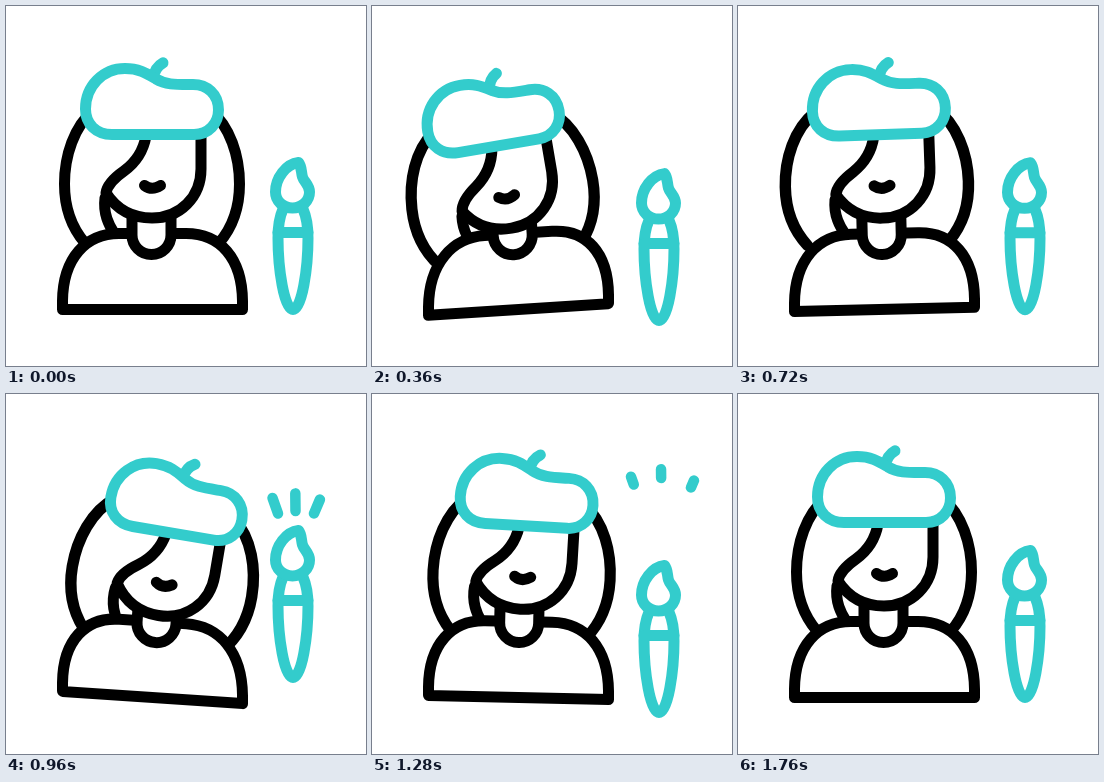
Animation of 360x360 px, one loop 2000 ms. Source, as an HTML page:

```html
<!DOCTYPE html>
<html lang="en">
<head>
<meta charset="utf-8">
<title>Artist and brush</title>
<style>
  @property --lean { syntax: "<angle>"; inherits: true; initial-value: 0deg; }

  html, body { margin: 0; width: 100%; height: 100%; overflow: hidden; background: #fff; }
  svg { display: block; width: 100vw; height: 100vh; }
  g, path {
    fill: #fff; stroke: #000; stroke-width: 11;
    stroke-linecap: round; stroke-linejoin: round;
  }
  .open path, path.open { fill: none; }
  .teal, .teal path { stroke: #33cccc; }

  .body, .torso, .neck, .head, .hair, .left, .brush {
    transform-box: view-box;
    animation: 2s ease-in-out infinite;
  }
  .body { animation-name: lean; }
  .torso, .neck { transform-origin: 146px 303.5px; }
  .torso { transform: skewY(var(--lean)); }
  .neck { rotate: var(--lean); }
  .head { transform-origin: 146px 250px; animation-name: tilt, sink; }
  .hair { transform-origin: 146px 250px; animation-name: sway; }
  .left { transform-origin: 86px 110px; animation-name: swing; }
  .brush { animation-name: bob; }
  .rays path { stroke-width: 10.5; animation: burst 2s linear infinite, blink 2s step-end infinite; }

  @keyframes lean {
    0%, 76%, 100% { --lean: 0deg; }
    28% { --lean: -5deg; }
    46% { --lean: 3.9deg; }
  }
  @keyframes tilt {
    0%, 76%, 100% { rotate: 0deg; }
    26% { rotate: -12deg; }
    47% { rotate: 9.6deg; }
  }
  @keyframes sink {
    0%, 76%, 100% { translate: 0 0; }
    26% { translate: 0 12px; animation-timing-function: ease-in; }
    36% { translate: 0 0; animation-timing-function: ease-out; }
    47% { translate: 0 9px; }
  }
  @keyframes sway {
    0%, 76%, 100% { translate: 0 0; scale: 1 1; }
    26% { translate: -2px 0; scale: 1.03 1; }
    36% { translate: -4px 0; scale: 1.04 1; }
    46% { translate: -2px 0; scale: 1.04 1; }
  }
  @keyframes swing {
    0%, 46%, 100% { rotate: 0deg; }
    26% { rotate: 4deg; }
    36% { rotate: 1deg; }
  }
  @keyframes bob {
    0%, 10%, 84%, 100% { translate: 0 0; }
    26% { translate: 0 22px; }
    46% { translate: 0 -21px; }
    64% { translate: 0 15px; }
  }
  /* each ray grows outward, then its inner end catches up */
  @keyframes burst {
    0%, 42% { stroke-dasharray: 0 300; stroke-dashoffset: 0; }
    48% { stroke-dasharray: 39 300; stroke-dashoffset: 0; }
    54% { stroke-dasharray: 59 300; stroke-dashoffset: 0; }
    56% { stroke-dasharray: 60 300; stroke-dashoffset: -4; }
    66% { stroke-dasharray: 10 300; stroke-dashoffset: -90; }
    68%, 100% { stroke-dasharray: 0 300; stroke-dashoffset: -100; }
  }
  @keyframes blink {
    0% { opacity: 0; }
    42% { opacity: 1; }
    68%, 100% { opacity: 0; }
  }
</style>
</head>
<body>
<svg viewBox="0 0 360 360">
  <g class="head open">
    <g class="hair">
      <path class="left" d="M88 104C68 120 58.5 150 58.5 178C58.5 202 66 222 79 237"/>
      <path d="M204 104C224 120 233.5 150 233.5 178C233.5 202 226 222 213 237"/>
    </g>
    <path d="M99 192C97 208 103 219 108 227"/>
  </g>

  <g class="body">
    <path class="torso" d="M56.5 303.5V295C57 252 80 227.5 113 227.5H180C214 227.5 236 252 236.5 295V303.5Z"/>
    <path class="neck" d="M126 205V229A19.5 19.5 0 0 0 165 229V205"/>
  </g>

  <g class="head">
    <path d="M140 130C137 147 129 157 118 165C108 172 101 180 100 187C111 204 127 212 146 212C174 212 195 191 195 163V130"/>
    <path class="open" d="M138.5 179.5Q146 185 154.5 179.5"/>
    <g class="teal">
      <path class="open" d="M147 73C148 65 151 60 157 56.8"/>
      <path d="M106 128.5H188C203 128.5 212.5 117 212.5 104C212.5 88 201 78.5 187 78.5C170 78.5 160 79 150 73C140 67 133 62.5 119 62.5C97 62.5 79.5 80 79.5 103C79.5 118 90 128.5 106 128.5Z"/>
    </g>
  </g>

  <g class="brush teal">
    <path d="M277 203C273 212 272 220 272 232C272 262 278 303.5 287 303.5C296 303.5 302 262 302 232C302 220 301 212 297 203"/>
    <path d="M272 226.5H302"/>
    <path d="M292.5 156.5C280 158 269.5 172 269.5 186C269.5 195 277 202 286.5 202C296 202 303.5 195 303.5 186C303.5 179 298 176 296.5 171C295 166 296 161 292.5 156.5Z"/>
  </g>

  <g class="rays teal open">
    <path pathLength="100" d="M272 119.5L258 80"/>
    <path pathLength="100" d="M289.5 117L289 72"/>
    <path pathLength="100" d="M308 119.5L323 84"/>
  </g>
</svg>
</body>
</html>
```
